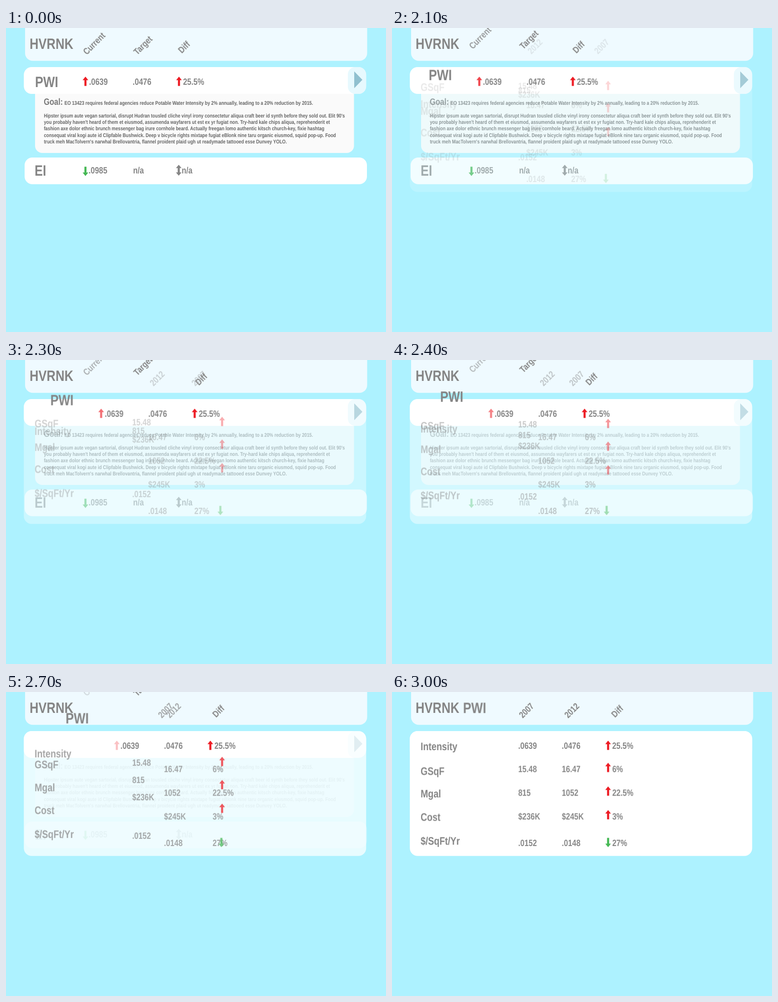
Recreate the animation shown at these times as an HTML page. Size 837x669 px, loop 5000 ms.

```html
<!DOCTYPE html>
<html lang="en">
<head>
<meta charset="utf-8">
<title>Water intensity panel</title>
<style>
  html, body { margin: 0; width: 100%; height: 100%; overflow: hidden; background: #adf2ff; }
  svg { display: block; width: 837px; height: 669px; }
  text {
    font: bold 20px "Liberation Sans", Arial, sans-serif;
    fill: #858585;
    text-rendering: geometricPrecision;
    white-space: pre;
  }
  .title { font-size: 33px; }
  .label { font-size: 24px; }
  .body { font-size: 11.8px; fill: #666; }
  .goal { fill: #777; }
  .tilt { text-anchor: middle; }

  /* Eleven hard steps of 100 ms, the first one at 2 s */
  .move { animation: move 5s steps(11, start) infinite; }
  .in { animation: move 5s steps(11, start) infinite, appear 5s steps(11, start) infinite; }
  .out { animation: move 5s steps(11, start) infinite, vanish 5s steps(11, start) infinite; }
  @keyframes move {
    0%, 40% { transform: translate(0, 0); }
    62%, 100% { transform: translate(var(--dx, 0), var(--dy, 0)); }
  }
  @keyframes appear { 0%, 40% { opacity: 0; } 62%, 100% { opacity: 1; } }
  @keyframes vanish { 0%, 40% { opacity: 1; } 62%, 100% { opacity: 0; } }
</style>
</head>
<body>
<svg id="stage" viewBox="0 0 837 669"></svg>
<script>
const RED = '#ed1c24', GREEN = '#45b854', GRAY = '#858585';
const CONDENSED = 'scale(.82 1)';
const ARROW = 'M0-10.2L6.2-2.6H2.3V10.2H-2.3V-2.6H-6.2Z';
const DOUBLE_ARROW = 'M0-12L6.2-4.8H2.3V4.8H6.2L0 12L-6.2 4.8H-2.3V-4.8H-6.2Z';

const text = (str, x, y, cls = '') =>
  `<text class="${cls}" transform="translate(${x} ${y}) ${CONDENSED}">${str}</text>`;
const tilted = (str, x, y) =>
  `<text class="tilt" y=".36em" transform="translate(${x} ${y}) rotate(-45) ${CONDENSED}">${str}</text>`;
const shape = (d, x, y, fill, flip = 1) =>
  `<path d="${d}" fill="${fill}" transform="translate(${x} ${y}) scale(1 ${flip})"/>`;
const up = (x, y) => shape(ARROW, x, y, RED);
const down = (x, y) => shape(ARROW, x, y, GREEN, -1);
const box = (x, y, w, h, r, fill) =>
  `<rect x="${x}" y="${y}" width="${w}" height="${h}" rx="${r}" fill="${fill}"/>`;
const animate = (kind, content, dx = 0, dy = 0) =>
  `<g class="${kind}" style="--dx:${dx}px;--dy:${dy}px">${content}</g>`;

const story = [
  "Hipster ipsum aute vegan sartorial, disrupt Hudran tousled cliche vinyl irony consectetur aliqua craft beer id synth before they sold out. Elit 90's",
  "you probably haven't heard of them et eiusmod, assumenda wayfarers ut est ex yr fugiat non. Try-hard kale chips aliqua, reprehenderit et",
  "fashion axe dolor ethnic brunch messenger bag irure cornhole beard. Actually freegan lomo authentic kitsch church-key, fixie hashtag",
  "consequat viral kogi aute id Clipfable Bushwick. Deep v bicycle rights mixtape fugiat eBlonk nine taru organic eiusmod, squid pop-up. Food",
  "truck meh MacTolvern's narwhal Brellovantria, flannel proident plaid ugh ut readymade tattooed esse Dunvey YOLO."
];

const goal = box(64, 120, 702.5, 155, 16, '#fafafa')
  + text('Goal:', 83.3, 169, 'goal')
  + text('EO 13423 requires federal agencies reduce Potable Water Intensity by 2% annually, leading to a 20% reduction by 2015.', 128.8, 169, 'body')
  + story.map((line, i) => text(line, 83.4, 197.2 + i * 14.1, 'body')).join('');

const energyRow = box(41, 285, 754, 58.7, 17, '#fff')
  + text('EI', 63, 325, 'title') + down(175, 315.5)
  + text('.0985', 182, 320) + text('n/a', 280, 320)
  + shape(DOUBLE_ARROW, 380.5, 313, GRAY) + text('n/a', 387, 320);

const button = box(753, 86, 40, 59, 16, '#e7f9fe')
  + '<path d="M767 95.5L785 114L767 132.5Z" fill="#90c0cf"/>';

// name, start and end baseline
const labels = [
  ['Intensity', 186, 128], ['GSqF', 128.5, 182.5], ['Mgal', 182, 232],
  ['Cost', 228.5, 283.5], ['$/SqFt/Yr', 281.5, 336]
];

// first year, its start baseline, second year, difference, end baseline
const rows = [
  ['15.48', 125, '16.47', '6%', 176.3],
  ['815', 125, '1052', '22.5%', 228.5],
  ['$236K', 125, '$245K', '3%', 280.6],
  ['.0152', 280.6, '.0148', '27%', 339]
];
const arrowStops = [117.5, 166, 218, 270];

const parts = [
  box(42, -30, 753.5, 102.3, 17, '#effaff'),
  animate('out', goal),
  animate('out', energyRow),
  animate('in', box(39.3, 86, 754, 274.7, 17, '#fff')),
  box(39.3, 86, 754, 59, 17, '#fff'),
  animate('out', button),

  text('HVRNK', 52, 46, 'title'),
  animate('move', text('PWI', 64, 129.7, 'title'), 92.5, -83.7),
  animate('out', tilted('Current', 194, 34), 0, -68.5),
  animate('move', tilted('Target', 301.5, 38), 0, -68.5),
  animate('move', tilted('Diff', 392, 42), 104, 0.5),
  animate('in', tilted('2007', 498.5, 40.5), -202.5),
  animate('in', tilted('2012', 297, 40.5), 99),

  animate('out', up(175, 117.3), 95),
  animate('move', text('.0639', 183, 125), 95),
  animate('move', text('.0476', 279, 125), 95),
  animate('move', up(381, 117.3) + text('25.5%', 390, 125), 95),

  ...labels.map(([name, from, to]) =>
    animate('in', text(name, 63, from, 'label'), 0, to - from)),
  ...rows.map(([first, from, second, diff, y]) =>
    animate('in', text(first, 278, from), 0, y - from)
    + animate('in', text(second, 278.5, y), 95.5)
    + animate('in', text(diff, 374.5, y), 110.7)),
  ...arrowStops.slice(1).map((y, i) =>
    animate('in', up(476, arrowStops[i]), 0, y - arrowStops[i])),
  animate('in', down(470, 331.3), 6)
];

document.getElementById('stage').innerHTML = parts.join('');
</script>
</body>
</html>
```
